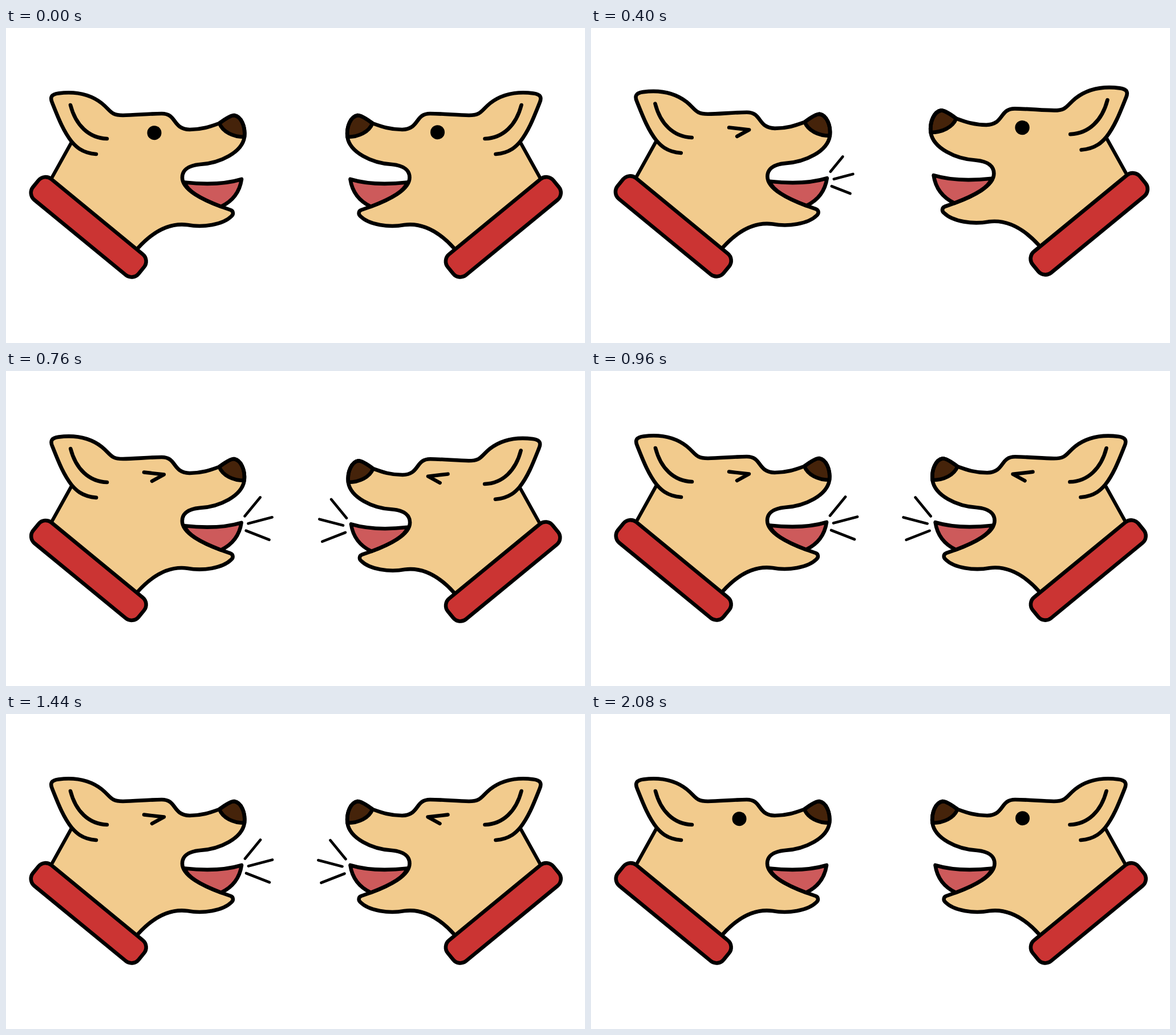
An HTML page for the animation above (2.32 s loop, 1015 by 552 pixels).

```html
<!DOCTYPE html>
<html lang="en">
<head>
<meta charset="utf-8">
<title>Barking dogs</title>
<style>
  html, body { margin: 0; width: 100%; height: 100%; overflow: hidden; background: #fff; }
  svg { display: block; width: 100%; height: 100%; }
  path, rect { stroke: #000; stroke-width: 6.6; stroke-linecap: round; stroke-linejoin: round; fill: none; }
  .skin { fill: #f2cb8d; stroke: none; }
  .tongue { fill: #cd5a5b; }
  .nose { fill: #45230a; }
  .collar { fill: #cb3433; }
  .neck { stroke-width: 6; }
  .squint { stroke-width: 6.4; }
  .rays path { stroke-width: 4.7; }
</style>
</head>
<body>
<svg viewBox="0 0 1015 552" id="stage"></svg>
<script>
const LOOP = 2320, STEP = 40, LAG = 240;

const earTop = 'C100 180 91 156 81 131C77 122 79 116 92 114.5C127 110 150 118 168 132C184 145 183 153 205 153';
const face = 'C225 153 250 150 273 150C300 150 291 177 322 178C345 178 360 172 374 167C386 158 394 153 400 153C412 155 420 172 418 191C414 218 375 237 340 239C318 241 309 250 309 262C309 284 345 301 377 313L394 319C399 321 399 327 395 330C380 345 345 350 318 345C280 340 250 365 231 386';
const rays = ['M419 253.5L446 220.5', 'M425 266.5L467 255.5', 'M421 279L462 295'];

const dogMarkup = right => `
  <g ${right ? 'transform="translate(1016.5) scale(-1 1)"' : ''}><g class="dog">
    <path class="skin" d="M80 263L115 199${earTop}${face}Z"/>
    <path class="neck" d="M80 263L115 200"/>
    <path class="tongue" d="M313 270.5C340 273.5 380 275 413 265C410 285 400 302 377 313C345 301 318 287 313 270.5Z"/>
    <path class="nose" d="M374 167C386 158 394 153 400 153C412 155 420 172 418 191C398 191 380 182 374 167Z"/>
    <path d="M158 221C132 219 121 206 115 199${earTop}${face}"/>
    <path d="M113 135C122 170 145 193 177 194"/>
    <rect class="collar" x="-119.5" y="-22.7" width="239.5" height="47" rx="16" transform="translate(145 348) rotate(39.4)"/>
    <ellipse class="eye" cx="260" cy="${right ? 182.7 : 183.7}" rx="12.5"/>
    <path class="squint" d="M242 176.5L277 180.5L256 192"/>
    <g class="rays" ${right ? 'transform="translate(2 .7)"' : ''}>
      ${rays.map(d => `<path pathLength="1" d="${d}"/>`).join('')}
    </g>
  </g></g>`;

const stage = document.getElementById('stage');
stage.innerHTML = dogMarkup(false) + dogMarkup(true);

const dogs = [...stage.querySelectorAll('.dog')].map((body, i) => ({
  body,
  lag: i * LAG,
  eye: body.querySelector('.eye'),
  squint: body.querySelector('.squint'),
  rays: body.querySelector('.rays')
}));

// [time, value] tables, eased between neighbours
const lunge = [[40, 0], [240, 1.6], [515, -.52], [650, .12], [770, -.13], [880, 0]];
const rayLength = [[232, 0], [472, 1], [1600, 1], [1840, 0]];

const clamp = x => Math.min(1, Math.max(0, x));
const ease = x => (1 - Math.cos(Math.PI * clamp(x))) / 2;
const ramp = (t, from, to) => clamp((t - from) / (to - from));

function sample(table, t) {
  let value = table[0][1];
  for (let i = 1; i < table.length; i++) {
    const [t0, v0] = table[i - 1], [t1, v1] = table[i];
    if (t >= t0) value = v0 + (v1 - v0) * ease((t - t0) / (t1 - t0));
  }
  return value;
}

function drawDog(dog, time) {
  const t = time - dog.lag;
  const scale = 1 + .015 * sample(lunge, t);
  dog.body.setAttribute('transform', `translate(231.5 700) scale(${scale}) translate(-231.5 -700)`);

  // each dog shuts its eyes in turn; both open together
  const open = time < 1400 ? 1 - ramp(t, 160, 250) : ramp(time, 1650, 1800);
  dog.eye.setAttribute('ry', 12.5 * open);
  dog.squint.style.display = open > 0 ? 'none' : '';

  const length = sample(rayLength, t);
  dog.rays.style.display = length > .001 ? '' : 'none';
  dog.rays.style.strokeDasharray = `${length} 2`;
}

const start = performance.now();

function render(now) {
  const elapsed = Math.max(0, now - start) % LOOP;
  const time = Math.floor(elapsed / STEP) * STEP;
  dogs.forEach(dog => drawDog(dog, time));
  requestAnimationFrame(render);
}
render(start);
</script>
</body>
</html>
```
